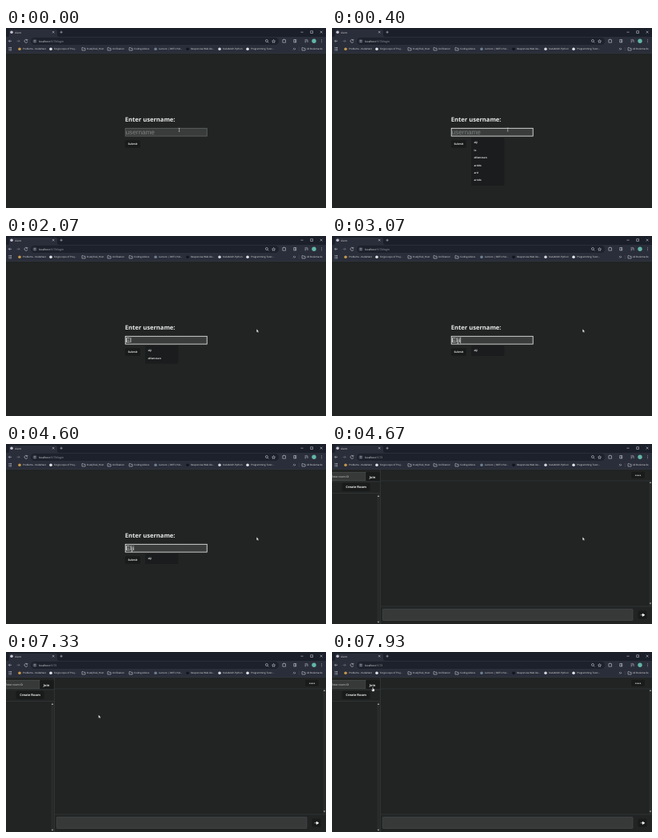
Animation, 400 px wide and 225 px high, one loop 8 s. Source, as an HTML page:

```html
<!DOCTYPE html>
<html lang="en">
<head>
<meta charset="utf-8">
<title>Chat login</title>
<style>
html, body { margin: 0; width: 100%; height: 100%; overflow: hidden; background: #212423; }
svg { display: block; width: 100vw; height: 100vh; text-rendering: geometricPrecision; }
text { font-family: "Open Sans", "Noto Sans", sans-serif; fill: #e8eaea; white-space: pre; }
.field { font-family: "Liberation Sans", Arial, sans-serif; font-size: 8.2px; }
.bold { font-weight: 700; }
.line { fill: none; stroke: #c3c7d0; stroke-width: .6; }
.edge { fill: none; stroke: #3b3f3e; stroke-width: .6; }
</style>
</head>
<body>
<svg viewBox="0 0 400 225" preserveAspectRatio="none">
  <rect width="400" height="225" fill="#212423"/>

  <g id="browser">
    <rect width="400" height="11" fill="#1b1f29"/>
    <path d="M2 11Q4 11 4 8V4Q4 2 6 2H62Q64 2 64 4V8Q64 11 66 11H400V31.5H0V11Z" fill="#2a2e3a"/>
    <rect x="31" y="12" width="310" height="9" rx="4.5" fill="#1d212b"/>
    <path d="M0 31.5H400" stroke="#383c47" stroke-width=".5"/>
    <circle cx="7" cy="5.3" r="1.8" fill="#c9c4d8"/>
    <path class="line" d="M58 4l2.4 2.4M60.4 4L58 6.400M67.500 5.200h3.200M69.100 3.600v3.200
      M368.500 5.200h3M380.700 3.700h2.800v2.800h-2.800zM392.700 3.700l2.800 2.800M395.500 3.700l-2.800 2.800
      M7 16.300H3.400l1.500-1.500M3.400 16.300l1.500 1.500M26.500 15a2 2 0 1 0 .4 2M26.700 14v1.500h-1.500"/>
    <path class="line" opacity=".5" d="M13.500 16.300h3.600l-1.500-1.500M17.100 16.300l-1.500 1.500"/>
    <circle cx="36" cy="16.400" r="2.700" fill="#343946"/>
    <path class="line" d="M34.600 15.600h2.800M34.600 17.200h2.800M327 17.200l1.300 1.300
      M334.500 14.500l.6 1.300 1.400.2-1 1 .2 1.400-1.200-.7-1.300.7.3-1.400-1-1 1.400-.2z
      M345.800 14.700h1.200v-.7h1v.7h1.500v3.500h-3.700z M359.700 14.500h3v3.500h-3z M361.700 14.500v3.500
      M373.500 14.800h3.500M373.500 16.300h2M373.500 17.800h1.500M377 15v3"/>
    <circle class="line" cx="325.900" cy="16" r="1.500"/>
    <circle cx="385" cy="16.300" r="2.700" fill="#62b6a8"/>
    <g fill="#d0d3da"><circle cx="394.500" cy="14.700" r=".45"/><circle cx="394.500" cy="16.300" r=".45"/><circle cx="394.500" cy="17.900" r=".45"/></g>
    <path d="M3.500 24.500h3.500M3.500 26.200h3.500M3.500 27.900h3.500" stroke="#b9bec9" stroke-width=".9" stroke-dasharray=".9 .4"/>
    <path class="line" d="M359 25l1.200 1.200-1.200 1.200M360.700 25l1.200 1.200-1.200 1.200"/>
    <path d="M366.300 23.500v5.500" stroke="#4a4f5d" stroke-width=".5"/>
    <text x="11" y="6.600" font-size="3.100">client</text>
    <text x="41" y="17.600" font-size="3.300">localhost<tspan fill="#a9adb8">:5173<tspan id="path">/login</tspan></tspan></text>
  </g>

  <g id="login">
    <text class="bold" x="148.700" y="117" font-size="7.600">Enter username:</text>
    <rect id="box" x="149.200" y="125.300" width="102" height="9.800" fill="#393c3b" stroke-width=".8"/>
    <text id="entry" class="field" x="149.500" y="133.100"></text>
    <path id="caret" d="M160.700 126.500v7.800" stroke="#fff" stroke-width=".6"/>
    <rect x="148.800" y="140.300" width="19" height="9.400" rx="1.800" fill="#191b1b"/>
    <text class="bold" x="158.300" y="146.200" font-size="3.300" text-anchor="middle">Submit</text>
    <g id="menu"><rect id="panel" x="174" y="137" width="41.500" rx="1" fill="#1a1c1d"/></g>
  </g>

  <g id="chat">
    <path class="edge" d="M60.500 32V225M0 47H60M61 46H400M61 203H400M0 61.500H60"/>
    <rect x="-2" y="35.300" width="44" height="10.500" fill="#363938" stroke="#555958" stroke-width=".5"/>
    <text x="-.8" y="41.700" font-size="3.300" fill="#858988">Enter room ID</text>
    <rect x="42.200" y="35.300" width="17.600" height="10.800" rx="1.500" fill="#191b1b"/>
    <text class="bold" x="50.500" y="42.600" font-size="4" text-anchor="middle">Join</text>
    <rect id="create" x="12.500" y="48.500" width="35" height="10.500" rx="1.800" fill="#191b1b" stroke-width=".5"/>
    <text class="bold" x="30" y="55.400" font-size="4" text-anchor="middle">Create Room</text>
    <rect x="56.500" y="63" width="3" height="161" fill="#292c2b"/>
    <rect x="396.500" y="46.500" width="3" height="156" fill="#292c2b"/>
    <path fill="#a5a9a8" d="M56.700 66l1.300-2 1.300 2zM56.700 221.700l1.300 2 1.300-2zM396.700 49l1.300-2 1.300 2zM396.700 198.500l1.300 2 1.300-2z"/>
    <rect x="374" y="34.800" width="17" height="8" rx="1.500" fill="#191b1b"/>
    <text class="bold" x="382.500" y="39.700" font-size="2.500" text-anchor="middle">Leave</text>
    <rect x="63.300" y="206.300" width="312.700" height="14.200" rx=".8" fill="#363938" stroke="#515554" stroke-width=".5"/>
    <rect x="382.500" y="208.500" width="11" height="10.200" rx="1.600" fill="#191b1b"/>
    <path d="M385.500 213.700h2.500M388 212l3 1.700-3 1.700z" fill="#fff" stroke="#fff" stroke-width=".5"/>
  </g>

  <g id="cursor">
    <path id="arrow" d="M0 0V4.200L1 3.300 1.700 4.800 2.400 4.500 1.700 3.100H3Z" fill="#fff" stroke="#111" stroke-width=".3"/>
    <path id="beam" d="M-.8-2h1.600M0-2V2M-.8 2h1.600" stroke="#ddd" stroke-width=".5"/>
    <path id="hand" d="M-.5 0Q0-.6.5 0V1.700L2.200 2.200V3.800L1.600 5H-.6L-1.700 3.100-1.200 2.600-.5 3.100Z" fill="#fff" stroke="#111" stroke-width=".3"/>
  </g>
</svg>
<script>
const FPS = 15, LOOP = 8000;
const $ = id => document.getElementById(id);

function add(parent, tag, attrs, text = "") {
  const el = document.createElementNS("http://www.w3.org/2000/svg", tag);
  for (const key in attrs) el.setAttribute(key, attrs[key]);
  el.textContent = text;
  return parent.appendChild(el);
}
const show = (id, on) => $(id).style.display = on ? "" : "none";

// Bookmarks: x, label, icon colour (none means folder)
[
  [17, "Problems - KodaNest", "#c99a4c"], [56, "Forgio repo of Proj...", "#e4e6ea"],
  [97, "StudyTrek_Host"], [129, "Unification"], [156, "Coding Advice"],
  [187, "Lumero | OKT's Hel...", "#70808f"], [227, "Responsive Web De...", "#11141f"],
  [267, "KodaMoth Python", "#d5d7dc"], [302, "Programming Tutor...", "#e4e6ea"],
  [372, "All Bookmarks"]
].forEach(([x, label, color]) => {
  if (color) add($("browser"), "circle", { cx: x, cy: 26.2, r: 1.8, fill: color });
  else add($("browser"), "path", { class: "line", d: `M${x - 2} 24.6h1.500l.6.7h2v2.700h-4.100z` });
  add($("browser"), "text", { x: x + 4, y: 27.3, "font-size": 2.95, fill: "#cfd2da" }, label);
});

const names = ["elji", "lo", "elfamosen", "arddo", "ard", "arndo"];
const rows = names.map(name =>
  add($("menu"), "text", { class: "bold", x: 177.5, "font-size": 3.1 }, name));

// Cursor stops: frame, x, y
const stops = [
  [0, 216.5, 127.3], [5, 216.5, 127.3], [13, 290.4, 120.2], [14, 290.4, 120.2],
  [16, 313.2, 116.3], [84, 313.2, 116.3], [86, 286, 107], [90, 286, 107],
  [95, 156.4, 74], [99, 166, 94.5], [107, 166, 94.5], [114, 38, 54], [119, 51, 44.3]
];

function cursorAt(frame) {
  const i = Math.max(1, stops.findIndex(s => s[0] >= frame));
  const [f0, x0, y0] = stops[i - 1], [f1, x1, y1] = stops[i];
  let p = (frame - f0) / (f1 - f0);
  p = p * p * (3 - 2 * p);
  return [x0 + (x1 - x0) * p, y0 + (y1 - y0) * p];
}

const inside = (x, y, left, top, right, bottom) =>
  x >= left && x <= right && y >= top && y <= bottom;

function drawLogin(frame) {
  const typed = "Elji".slice(0, [22, 30, 37, 40].filter(f => frame >= f).length);
  const focused = frame >= 1;
  $("box").setAttribute("stroke", focused ? "#f2f2f2" : "#626665");
  $("entry").textContent = typed || "username";
  $("entry").style.fill = typed ? "#f5f5f5" : "#7e8281";
  show("caret", frame >= 40 && frame < 53 || frame >= 57 && frame < 69);
  show("menu", frame >= 3);

  let count = 0;
  rows.forEach((row, i) => {
    const match = names[i].startsWith(typed.toLowerCase());
    row.style.display = match ? "" : "none";
    if (match) row.setAttribute("y", 144.3 + 9.4 * count++);
  });
  $("panel").setAttribute("height", 3.6 + 9.4 * count);
}

function draw(now) {
  const frame = Math.floor((now % LOOP + 4) * FPS / 1000) % (LOOP * FPS / 1000);
  const login = frame < 70;
  show("login", login);
  show("path", login);
  show("chat", !login);
  if (login) drawLogin(frame);

  const [x, y] = cursorAt(frame);
  const onField = login && inside(x, y, 149, 125, 251, 135);
  const onCreate = !login && inside(x, y, 12, 48, 47, 59);
  const onJoin = !login && inside(x, y, 42, 35, 60, 46);
  $("cursor").setAttribute("transform", `translate(${x} ${y})`);
  show("beam", onField);
  show("hand", onCreate || onJoin);
  show("arrow", !onField && !onCreate && !onJoin);
  $("create").setAttribute("stroke", onCreate ? "#646cff" : "none");
}

const start = performance.now();
function tick() {
  draw(performance.now() - start);
  requestAnimationFrame(tick);
}
tick();
</script>
</body>
</html>
```
